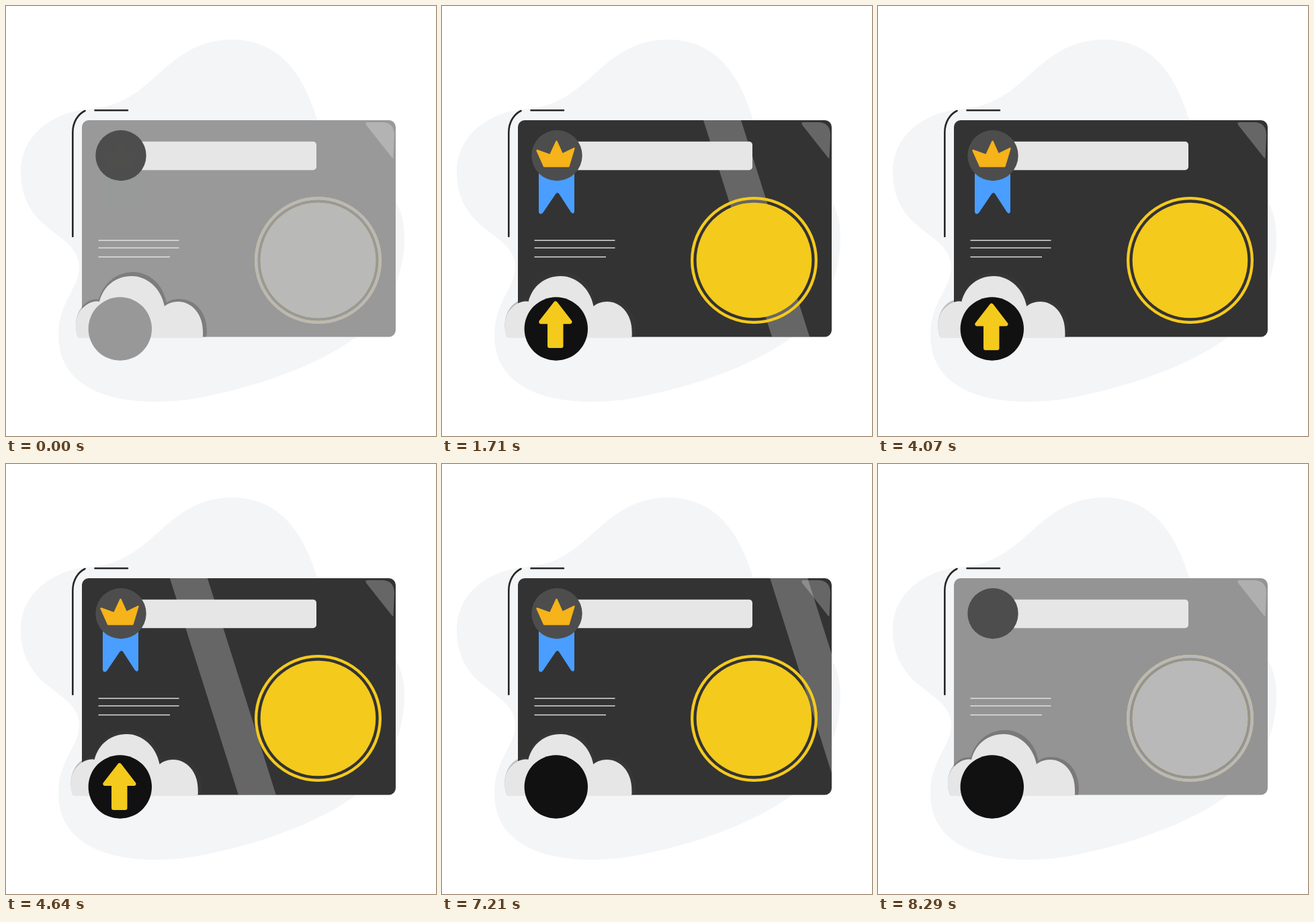
Write an HTML page with a canvas that moves like this. It is 640x640 px and loops after 8.43 s.

```html
<!DOCTYPE html>
<html lang="en">
<head>
<meta charset="utf-8">
<title>Card upload</title>
<style>
  html, body { margin: 0; width: 100%; height: 100%; overflow: hidden; background: #fff; }
  canvas { display: block; width: 100%; height: 100%; }
</style>
</head>
<body>
<canvas id="stage" width="640" height="640"></canvas>
<script>
const ctx = document.getElementById('stage').getContext('2d');
const LOOP = 8430;
const SWEEP = LOOP / 3;
const TAU = Math.PI * 2;
const YELLOW = '#f4ca1d';
const LIGHT = '#e6e6e6';

const shapes = {
  blob: 'M22 247C22 200 58 162 118 154C160 151 182 140 216 111C247 84 278 50 336 50' +
    'C405 50 442 98 464 172C480 230 520 250 560 270C585 288 593 315 593 345' +
    'C593 400 570 455 521 493C450 545 340 575 270 586C170 598 78 575 78 490' +
    'C78 440 109 420 109 388C109 362 85 348 60 328C35 307 22 282 22 247Z',
  frame: 'M99.3 343V188C99.3 173 107 161 117.5 156M132.5 155.3H181',
  gloss: 'M538 173H559C572 173 578 180 578 192L576.5 225Q576 228 574 225L536 177Q534 173 538 173Z',
  ribbon: 'M144 245H197V306Q196 311 192 307L174.5 280Q172 276 169 280L150 308Q145 312 144 306Z',
  crown: 'M141.5 215L161 222L170.5 201.5L179 220.5L196.5 212L188.5 238.5H152Z',
  arrow: 'M169 442.3L190.5 470.2H177.5V506H160V470.2H147.3Z',
  cloud: 'M108 494C101 478 104 462 111 453C119 443 130 438 139 440C145 417 163 402 187 402' +
    'C211 402 231 421 236 447C240 443 248 440 256 440C276 440 293 458 293 484Q293.500 490 292.500 494Z',
  shade: 'M107 492.500C101 476 104 460 112 449C119 440 129 435 138 437C145 412 165 396 189 396' +
    'C214 396 234 415 239 442C243 438 250 436 257 436C281 436 299 455 299 484Q299 488 298 492.500Z'
};
for (const name in shapes) shapes[name] = new Path2D(shapes[name]);

const card = new Path2D();
card.roundRect(113, 170, 467, 322.5, 10);

const coin = new Path2D();
coin.arc(464.5, 378.5, 94.5, 0, TAU);
coin.moveTo(554.7, 378.5);
coin.arc(464.5, 378.5, 90.2, 0, TAU, true);
coin.moveTo(550.3, 378.5);
coin.arc(464.5, 378.5, 85.8, 0, TAU);

const clamp = v => Math.max(0, Math.min(1, v));
const mix = (a, b, k) => a + (b - a) * k;
const grey = v => `rgb(${Math.round(v)},${Math.round(v)},${Math.round(v)})`;

function fill(path, color, alpha = 1) {
  ctx.globalAlpha = alpha;
  ctx.fillStyle = color;
  ctx.fill(path);
  ctx.globalAlpha = 1;
}

function soft(path, color, width, alpha) {
  ctx.globalAlpha = alpha;
  ctx.fillStyle = ctx.strokeStyle = color;
  ctx.lineWidth = width;
  ctx.fill(path);
  if (alpha > 0) ctx.stroke(path);
  ctx.globalAlpha = 1;
}

function disc(x, y, r, color) {
  ctx.beginPath();
  ctx.arc(x, y, r, 0, TAU);
  ctx.fillStyle = color;
  ctx.fill();
}

// Turning points of the cloud drift, right and left in turn
const turns = [0, 1090, 2650, 3790, 5420, 6650, 8100];
function drift(t) {
  for (let i = 1; i < turns.length; i++) {
    if (t < turns[i]) {
      const k = (t - turns[i - 1]) / (turns[i] - turns[i - 1]);
      const wave = Math.cos(Math.PI * k) * (i % 2 ? 1 : -1);
      return -7.9 + 7.9 * wave;
    }
  }
  return 0;
}

function sheenX(t) {
  const k = clamp((t % SWEEP - 1082) / 1524);
  const eased = k < 0.5 ? 4 * k ** 3 : 1 - 4 * (1 - k) ** 3;
  return 600 - 750 * eased;
}

function sheen(t) {
  const x = sheenX(t);
  ctx.save();
  ctx.clip(card);
  ctx.beginPath();
  ctx.moveTo(x, 170);
  ctx.lineTo(x + 56, 170);
  ctx.lineTo(x + 158, 492.5);
  ctx.lineTo(x + 102, 492.5);
  ctx.fillStyle = 'rgba(255,255,255,0.25)';
  ctx.fill();
  ctx.restore();
}

function draw(t) {
  const start = clamp(t / 500);
  const tone = Math.min(start, clamp((8320 - t) / 600));
  const tint = Math.min(start, clamp((8230 - t) / 520));
  const arrowAlpha = Math.min(clamp((t - 450) / 350), clamp((6850 - t) / 300));

  ctx.fillStyle = '#fff';
  ctx.fillRect(0, 0, 640, 640);
  ctx.lineCap = ctx.lineJoin = 'round';

  fill(shapes.blob, '#f4f5f7');
  ctx.strokeStyle = '#262626';
  ctx.lineWidth = 2.6;
  ctx.stroke(shapes.frame);

  fill(card, grey(mix(153, 51, tone)));
  sheen(t);
  fill(shapes.gloss, '#fff', 0.25);

  ctx.beginPath();
  ctx.roundRect(185, 201.7, 277, 42.5, 5);
  ctx.fillStyle = LIGHT;
  ctx.fill();

  for (const [y, end] of [[348.8, 257.5], [360, 257.5], [373.5, 244]]) {
    ctx.fillRect(137.5, y - 0.7, end - 137.5, 1.4);
  }

  fill(shapes.ribbon, '#4a9eff', tint);
  disc(171, 222.5, 37.7, '#4d4d4d');
  soft(shapes.crown, '#f6b31a', 2.4, tint);

  fill(coin, YELLOW);
  fill(coin, '#b9b9b9', 1 - tint);

  ctx.save();
  ctx.translate(drift(t), 0);
  fill(shapes.shade, '#3d3d3d', 0.3);
  fill(shapes.cloud, LIGHT);
  ctx.restore();

  disc(169.8, 480.5, 47.2, grey(mix(152, 17, start)));

  ctx.save();
  ctx.translate(0, 3.2 + 3.2 * Math.cos(TAU * (t - 3000) / 860));
  soft(shapes.arrow, YELLOW, 6, arrowAlpha);
  ctx.restore();
}

function tick(now) {
  draw(now % LOOP);
  requestAnimationFrame(tick);
}
draw(0);
requestAnimationFrame(tick);
</script>
</body>
</html>
```
